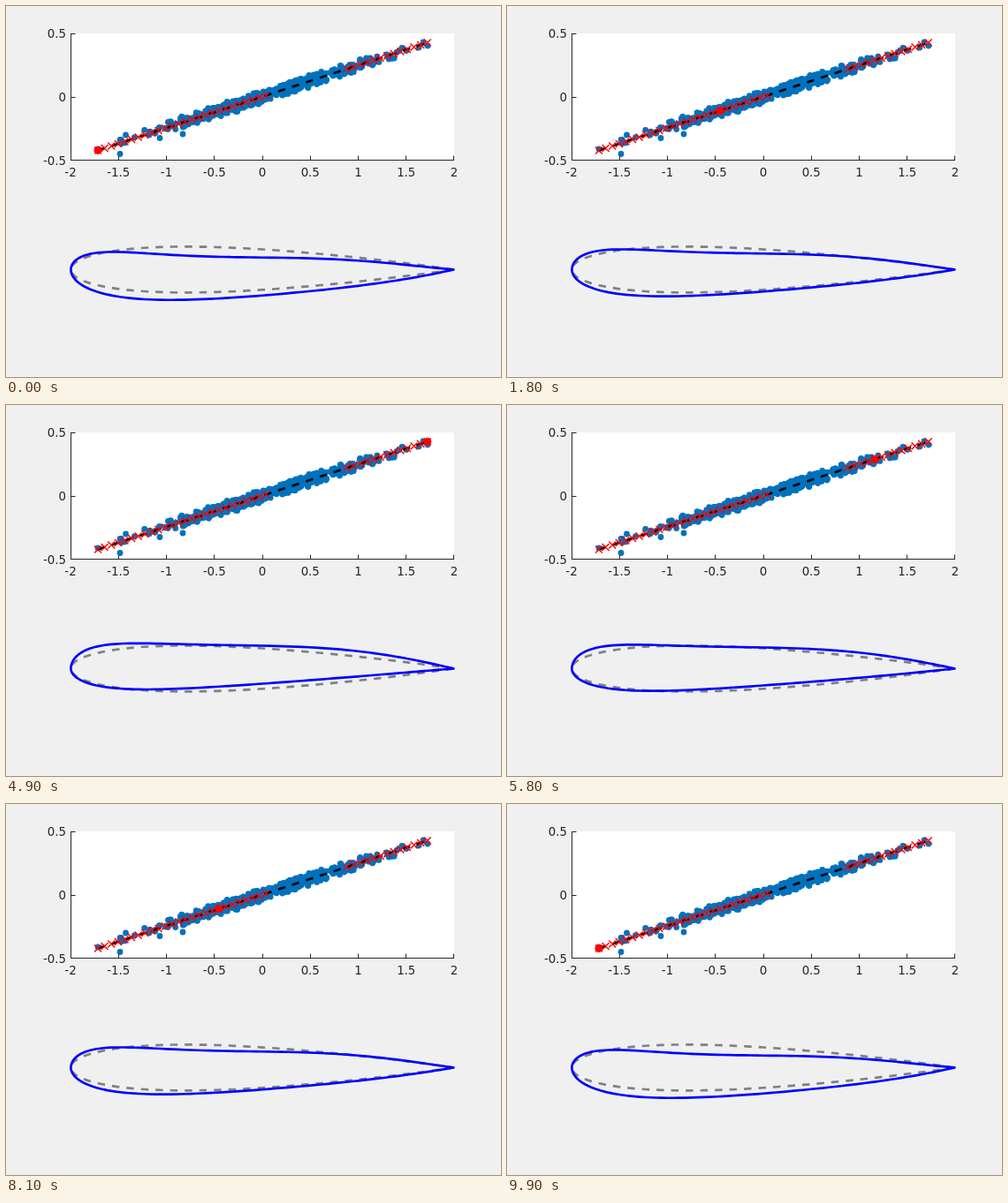
These frames come from a looping animation (560 by 420 pixels, 10000 ms). An HTML page:

```html
<!DOCTYPE html>
<html lang="en">
<head>
<meta charset="utf-8">
<title>Airfoil mode sweep</title>
<style>
html, body { margin: 0; width: 100%; height: 100%; overflow: hidden; background: #f0f0f0; }
svg { display: block; width: 560px; height: 420px; }
text { font: 13.33px "DejaVu Sans", sans-serif; fill: #262626; }
.dashed { stroke-width: 2.67; stroke-dasharray: 8.5 8; fill: none; }
</style>
</head>
<body>
<svg viewBox="0 0 560 420">
  <rect width="560" height="420" fill="#f0f0f0"/>
  <rect x="73" y="31" width="434" height="144" fill="#fff"/>
  <g id="axes" stroke="#262626" fill="none"></g>
  <g id="labels"></g>
  <g id="cloud" fill="#0072bd"></g>
  <path id="fit" class="dashed" stroke="#000"/>
  <path id="crosses" stroke="#f00" stroke-width="1.4" fill="none"/>
  <circle id="marker" r="4.5" fill="#f00"/>
  <path id="base" class="dashed" stroke="#808080"/>
  <path id="foil" stroke="#00f" stroke-width="2.67" stroke-linejoin="round" fill="none"/>
</svg>
<script>
const STEPS = 50, FRAME = 100;
const X0 = 104, X1 = 476.8, Y0 = 163.4, Y1 = 41.5;
const NOSE = 73.4, CHORD = 433, MID = 298.4;

const el = id => document.getElementById(id);
const lerp = (a, b, k) => a + (b - a) * k;
const fitX = k => lerp(X0, X1, k);
const fitY = x => lerp(Y0, Y1, (x - X0) / (X1 - X0));

function add(parent, tag, attrs, text = "") {
  const node = document.createElementNS("http://www.w3.org/2000/svg", tag);
  for (const k in attrs) node.setAttribute(k, attrs[k]);
  node.textContent = text;
  el(parent).appendChild(node);
}

const setPath = (id, d) => el(id).setAttribute("d", d);
const toPath = pts => "M" + pts.map(p => p.map(v => v.toFixed(2)).join(" ")).join("L");

// Axes
let axis = "M73.5 31V174.5H507";
for (let i = 0; i <= 8; i++) {
  const x = 73 + i * 54.25;
  axis += `M${Math.min(506, Math.floor(x)) + 0.5} 174.5v-5`;
  add("labels", "text", { x, y: 193, "text-anchor": "middle" }, i / 2 - 2);
}
for (let i = 0; i <= 2; i++) {
  axis += `M73.5 ${Math.min(174.5, 31.5 + i * 72)}h5`;
  add("labels", "text", { x: 68, y: 36 + i * 72, "text-anchor": "end" }, 0.5 - i / 2);
}
add("axes", "path", { d: axis });

// Scatter: seeded bell-shaped band, wider at the left, plus a few stray dots
let seed = 7;
const rnd = () => (seed = (seed * 16807) % 2147483647) / 2147483647;
const dot = (x, y) => add("cloud", "circle", { cx: x.toFixed(1), cy: y.toFixed(1), r: 3.4 });
for (let i = 0; i < 480; i++) {
  const k = (rnd() + rnd() + rnd()) / 3;
  const x = fitX(k);
  dot(x, fitY(x) + (rnd() + rnd() - 1) * lerp(9, 6.5, k));
}
[[104, 162], [129, 167.5], [129, 151.5], [174, 149.5], [200, 145], [467, 47], [472, 41], [477, 45]]
  .forEach(p => dot(...p));

setPath("fit", toPath([[X0, Y0], [X1, Y1]]));

let marks = "";
for (let i = 0; i < STEPS; i++) {
  if (i > 25 && i < 37) continue;
  const x = fitX(i / (STEPS - 1));
  marks += `M${x - 4} ${fitY(x) - 4}l8 8m0 -8l-8 8`;
}
setPath("crosses", marks);

// Closed outline, tail to nose to tail; height(u, side) is measured downwards
function outline(height) {
  const pts = [];
  for (let i = -90; i <= 90; i++) {
    const u = (1 - Math.cos(i / 90 * Math.PI)) / 2;
    pts.push([NOSE + u * CHORD, MID + height(u, Math.sign(i))]);
  }
  return toPath(pts);
}

// Round nose, sharp tail, shaped by a cubic
const shape = (u, [a, b, c, d]) => Math.sqrt(u) * (1 - u) * (a + u * (b + u * (c + u * d)));
const THICK = [104, -218.7, 345.8, -162.4];
const CAMBER0 = [-4.5, -137, 297.3, -187.4];
const CAMBER1 = [17, -89.1, 213.8, -108];

// Symmetric 12 % section
const naca = u => 0.6 * CHORD *
  (0.2969 * Math.sqrt(u) - 0.126 * u - 0.3516 * u * u + 0.2843 * u ** 3 - 0.1036 * u ** 4);
setPath("base", outline((u, side) => side * naca(u)));

function draw(ms) {
  const f = Math.floor(ms / FRAME) % (2 * STEPS);
  const k = Math.min(f, 2 * STEPS - 1 - f) / (STEPS - 1);
  const camber = CAMBER0.map((c, i) => lerp(c, CAMBER1[i], k));
  el("marker").setAttribute("cx", fitX(k));
  el("marker").setAttribute("cy", lerp(Y0, Y1, k));
  setPath("foil", outline((u, side) => side * shape(u, THICK) - shape(u, camber)) + "Z");
}

const start = performance.now();
function tick() {
  draw(performance.now() - start);
  requestAnimationFrame(tick);
}
tick();
</script>
</body>
</html>
```
